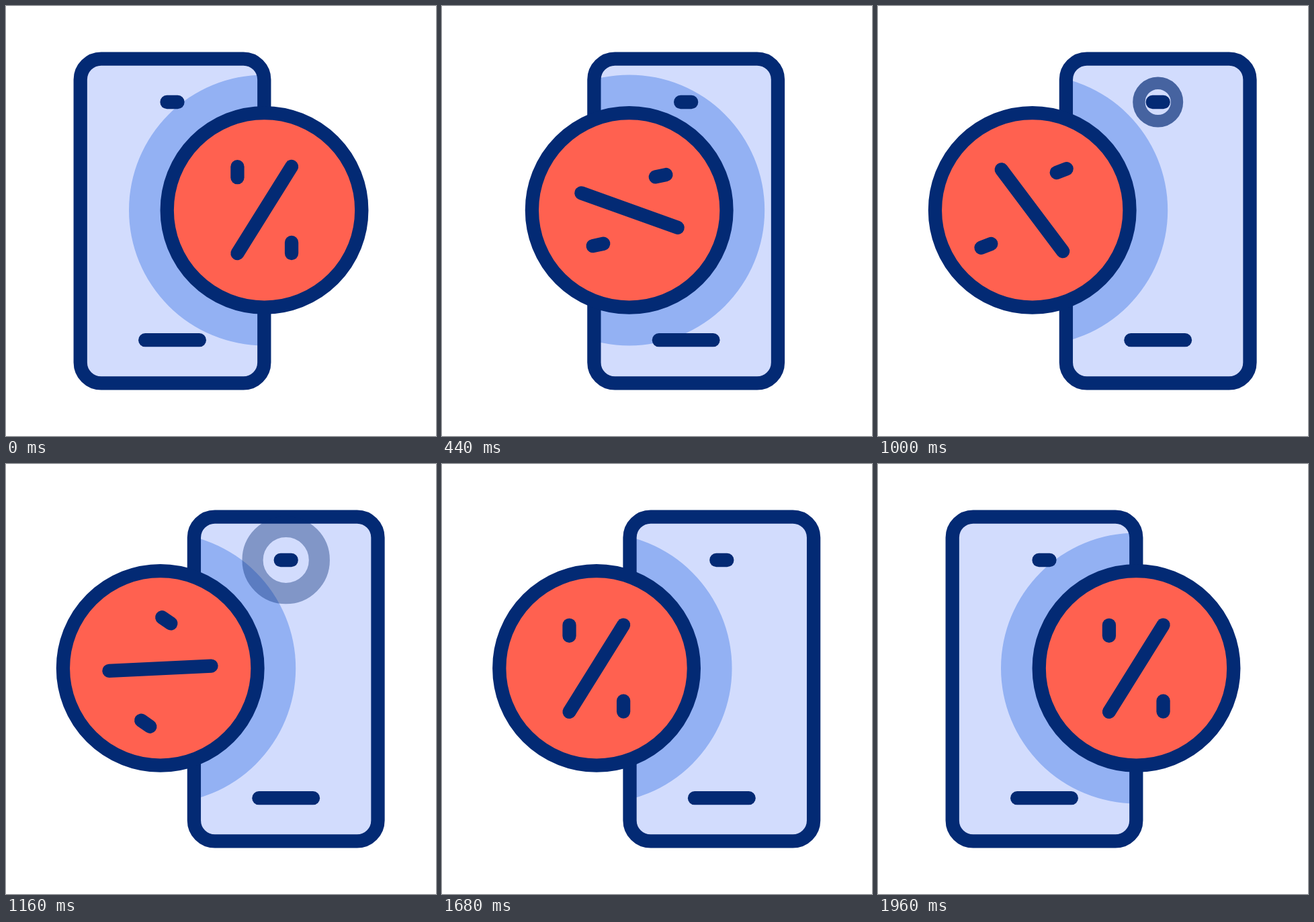
An HTML page with a canvas for the animation above (2000 ms loop, 640x640 px).

```html
<!DOCTYPE html>
<html lang="en">
<head>
<meta charset="utf-8">
<title>Phone and discount badge</title>
<style>
  html, body { margin: 0; width: 100%; height: 100%; overflow: hidden; background: #fff; }
  canvas { display: block; width: 100vmin; height: 100vmin; }
</style>
</head>
<body>
<canvas></canvas>
<script>
const STAGE = 640, LOOP = 2000, STEP = 40;
const NAVY = '#032a74', LIGHT = '#d2dcfd', ACCENT = '#93b1f3', RED = '#ff6150';
const LINE = 20.3;

// Paths on which the two small dashes swap places, relative to the badge centre
const SWAP = [
  [[-40.3, -56.4], [-139, 0], [-44, 140], [40.3, 56.4]],
  [[40.3, 56.4], [84, -64], [33, -93.5], [-40.3, -56.4]]
];

const canvas = document.querySelector('canvas');
const ctx = canvas.getContext('2d');

const lerp = (a, b, k) => a + (b - a) * k;
const progress = (t, from, to) => Math.min(1, Math.max(0, (t - from) / (to - from)));
const smooth = p => p * p * (3 - 2 * p);
const ease = (t, from, to) => smooth(progress(t, from, to));

// Hermite easing: brisk start, soft landing
const brisk = p => smooth(p) + 0.96 * p * (1 - p) ** 2 - 0.17 * p * p * (1 - p);

function bezier([a, b, c, d], t) {
  const u = 1 - t;
  return [0, 1].map(i =>
    u ** 3 * a[i] + 3 * u * u * t * b[i] + 3 * u * t * t * c[i] + t ** 3 * d[i]);
}

function at(x, y, angle, draw) {
  ctx.save();
  ctx.translate(x, y);
  ctx.rotate(angle);
  draw();
  ctx.restore();
}

function line(x1, y1, x2, y2) {
  ctx.beginPath();
  ctx.moveTo(x1, y1);
  ctx.lineTo(x2, y2);
  ctx.stroke();
}

function circle(x, y, r) {
  ctx.beginPath();
  ctx.arc(x, y, r, 0, Math.PI * 2);
}

function drawRing(x, y, t) {
  const k = ease(t, 680, 1520);
  if (k <= 0 || k >= 1) return;
  const outer = lerp(5.5, 104, k), inner = lerp(1.75, 55.1, k);
  ctx.save();
  ctx.globalAlpha = 1 - k;
  ctx.lineWidth = outer - inner;
  circle(x, y, (outer + inner) / 2);
  ctx.stroke();
  ctx.restore();
}

function drawPhone(x, badgeX, badgeY, t) {
  const body = new Path2D();
  body.roundRect(x - 136.8, 78.6, 273.6, 482.8, 31);
  ctx.fillStyle = LIGHT;
  ctx.fill(body);

  ctx.save();
  ctx.clip(body);
  ctx.fillStyle = ACCENT;
  circle(badgeX, badgeY, 201.5);
  ctx.fill();
  ctx.restore();

  ctx.stroke(body);
  drawRing(x, 143, t);
  line(x - 8, 143, x + 8, 143);
  line(x - 40.3, 497.2, x + 40.3, 497.2);
}

function drawBadge(x, y, t) {
  ctx.fillStyle = RED;
  circle(x, y, 144.8);
  ctx.fill();
  ctx.stroke();

  const turn = Math.PI * ease(t, 240, 680);
  const spinTime = progress(t, 680, 1440);
  const spin = Math.PI * smooth(spinTime);

  at(x, y, turn, () => {
    ctx.translate(0.25, -0.3);
    at(0, 0, -spin, () => line(-40.3, 64.6, 40.3, -64.6));
    for (const path of SWAP) {
      const [dx, dy] = bezier(path, brisk(spinTime));
      // The group is already turned by half, so the path is mirrored
      at(-dx, -dy, spin, () => line(0, -8, 0, 8));
    }
  });
}

function draw(t) {
  const size = Math.round(Math.min(innerWidth, innerHeight) * devicePixelRatio) || STAGE;
  if (canvas.width !== size) canvas.width = canvas.height = size;
  ctx.setTransform(size / STAGE, 0, 0, size / STAGE, 0, 0);
  ctx.fillStyle = '#fff';
  ctx.fillRect(0, 0, STAGE, STAGE);
  ctx.strokeStyle = NAVY;
  ctx.lineWidth = LINE;
  ctx.lineCap = 'round';

  const slide = ease(t, 260, 548) - ease(t, 1672, 1960);
  const badgeX = lerp(384.5, 229.7, slide), badgeY = 303.9;
  drawPhone(lerp(247.5, 416.7, slide), badgeX, badgeY, t);
  drawBadge(badgeX, badgeY, t);
}

const start = performance.now();

function tick() {
  const t = (performance.now() - start) % LOOP;
  draw(Math.floor(t / STEP) * STEP);
  requestAnimationFrame(tick);
}
tick();
</script>
</body>
</html>
```
